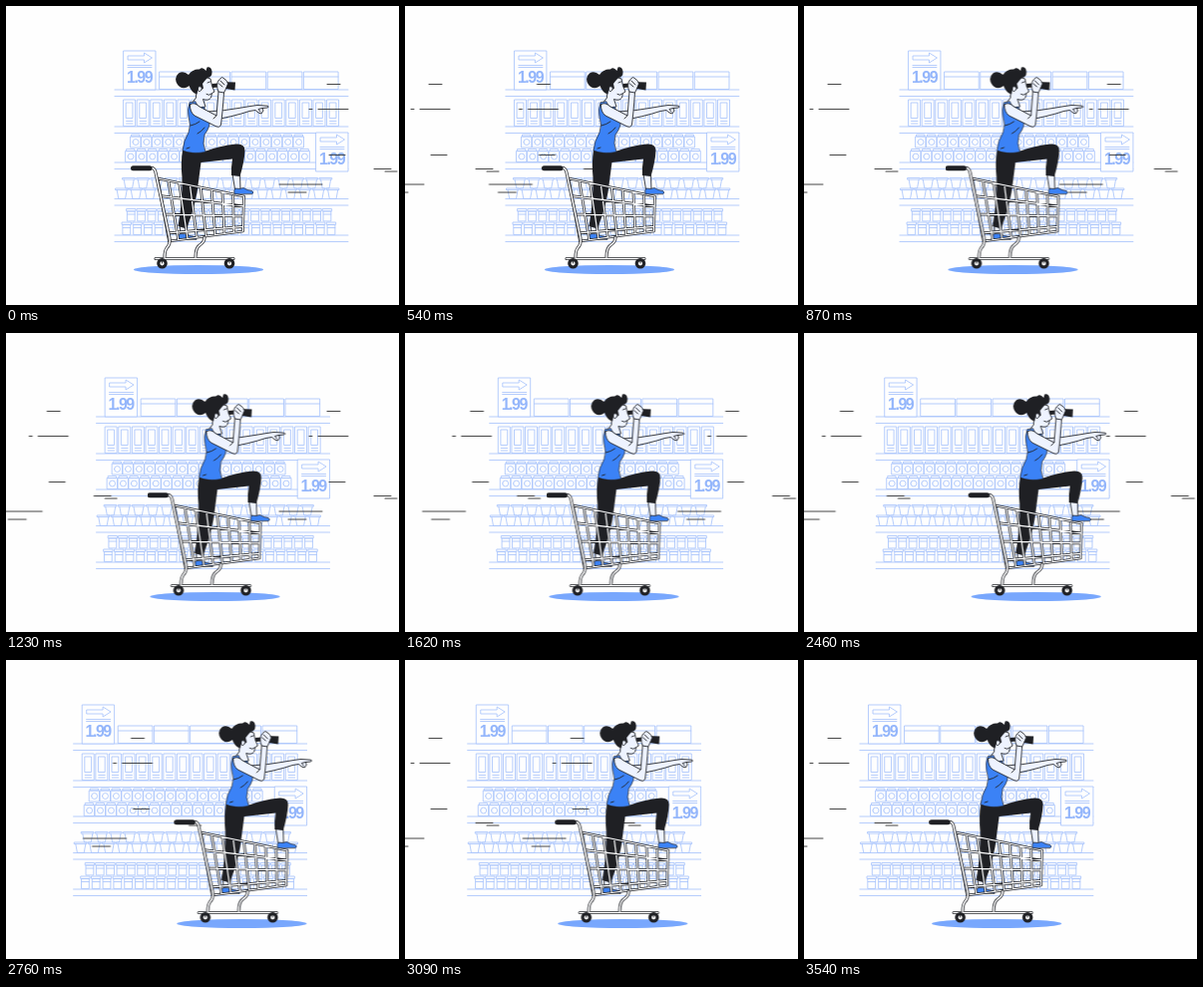
An HTML page that plays this animation: 394 by 300 pixels, repeating every 3570 ms.

```html
<!DOCTYPE html>
<html lang="en">
<head>
<meta charset="utf-8">
<title>Shopping trip</title>
<style>
  html, body { margin: 0; width: 100%; height: 100%; overflow: hidden; background: #fefefe; }
  svg { display: block; width: 394px; height: 300px; }
  path, ellipse, circle { stroke-linecap: round; stroke-linejoin: round; }

  #shelf { fill: none; stroke: #a9c5fc; stroke-width: .85; animation: drift 3570ms linear infinite; }
  #tag .paper { fill: #fefefe; }
  #tag text { fill: #94b6fb; stroke: none; font: 700 16px "Liberation Sans", Arial, sans-serif; letter-spacing: -1.5px; }
  #wind g { fill: none; stroke: #333; stroke-width: .9; animation: gust 3570ms linear infinite; }
  #rider { animation: roll 3570ms infinite; }

  .line { fill: none; stroke: #24262b; stroke-width: .9; }
  .skin { fill: #eef3ff; stroke: #24262b; stroke-width: .9; }
  .dark { fill: #1f2024; }
  .blue { fill: #3b82f6; stroke: #24262b; stroke-width: .7; }
  .tube { fill: none; stroke: #24262b; stroke-width: 3.1; }
  .gloss { fill: none; stroke: #fff; stroke-width: 1.5; }

  @keyframes drift { to { transform: translateX(-53.5px); } }
  @keyframes roll {
    0% { transform: translateX(0); animation-timing-function: cubic-bezier(.33, 0, .67, 1); }
    23.2% { transform: translateX(16.5px); }
    49% { transform: translateX(16.5px); animation-timing-function: cubic-bezier(.33, 0, .67, 1); }
    75.6% { transform: translateX(44px); animation-timing-function: cubic-bezier(.33, 0, .67, 1); }
    100% { transform: translateX(0); }
  }
  @keyframes gust {
    0% { transform: translateX(2px); visibility: hidden; animation-timing-function: step-end; }
    .7% { transform: translateX(2px); visibility: visible; animation-timing-function: cubic-bezier(.37, 0, .63, 1); }
    15.4% { transform: translateX(-296px); visibility: visible; }
    21.5% { transform: translateX(-296px); visibility: visible; animation-timing-function: step-end; }
    21.51%, 100% { transform: translateX(-296px); visibility: hidden; }
  }
</style>
</head>
<body>
<svg viewBox="0 0 394 300">
  <defs>
    <g id="tag">
      <path class="paper" d="M118 45h32v39h-32z"/>
      <path d="M122.500 50H138.500V47L146.500 52L138.500 57V54H122.500zM122 59.500H146M122 61.500H146"/>
      <text x="121" y="77">1.99</text>
    </g>
    <path id="streaks" d="M320 78.500h13M302 103.500h3M311 103.500h30M322 149.500h16M367 163.500h17M378 166h12M272 179h43M281 187h18"/>
    <path id="frame" d="M146 162.500Q149 162.500 150 167L164 233Q165 239 161 243Q159 246 159 252M199 232Q199 237 194 240Q190 243 190 252M150 253.500H228"/>
    <path id="basket"/>
    <path id="shoe" class="blue" d="M229 188.500Q228 184.500 230 183Q235 184 238 182.500Q242 185 246.500 185.500Q249 187 247 188.500z"/>
  </defs>

  <g id="shelf"></g>
  <g id="wind"></g>

  <g id="rider">
    <ellipse cx="193" cy="264.500" rx="65" ry="4.500" fill="#78a7fd"/>

    <!-- far arm -->
    <path class="skin" d="M202 106Q220 105 233 102.500L245 100.500L252 99.500L262.500 100.200Q264 101.500 262 102L257 102.500L258 105L256 108L253 107L250 104.500L244 105.500Q228 111 204 115z"/>
    <path class="line" d="M257 102.500L253 103.500L255 106"/>

    <!-- legs -->
    <path class="skin" d="M174 218L175 230H181L182 218zM227 168L229.500 184H235L234.500 168z"/>
    <path class="blue" d="M172.500 234Q171.500 230 175 228.500Q181 228 184 230.500Q191 231 191 234z"/>
    <path class="dark" d="M177 145Q175 157 176.500 172Q177 196 172.500 221L181 223.500Q191 198 193 176L195.500 157L227 153.500Q225.500 162 226 170L234.500 171Q239 156 239.500 145Q239.500 138 231 138.500Q214 140 199 146z"/>

    <!-- head -->
    <path class="skin" d="M191 80L190.500 92L186 98L192 103L200 101L197.500 93.500Q203 95.500 205.500 92L206.500 87.500L209 86L206.500 80L205 73L195 70z"/>
    <path class="line" d="M201 88.500Q203.500 90.500 206 88M202 77L204.500 76"/>
    <path class="dark" d="M183 69Q178 64.500 173 67.500Q168 72 171.500 78Q174 83 180 82Q182 81.500 183.500 80Q186 87 191.500 88.500Q192 84 194 82Q196 85 198 82.500L197 78Q200 74 202 72Q207 71.500 206.500 65.500Q205.500 60.500 201.500 61.500L200.500 65Q197 60.500 194 63.500Q187 63 183 69z"/>
    <path class="skin" d="M193 81Q197 80 196 84Q194.500 87 192.500 85z"/>

    <!-- top -->
    <path class="blue" d="M184 97Q181.500 104 183 111Q186 119 183 127Q178 135 177 145Q186 149 200 146.500Q196.500 138 199 129Q205.500 121 204 112L198 101Q193 104 190 96z"/>
    <path class="line" d="M185 120Q190 119 194 116M181 143L184 142M192 128Q196 126 199 122"/>

    <!-- near arm and binoculars -->
    <path class="dark" d="M206.500 78L213 77.500V81.500L207 82zM214 76L230 76.500L229.500 84.500L214 82z"/>
    <path class="skin" d="M184.500 99Q188 95.500 194 101L211 110L213 86Q210 79 213.500 74L216.500 71.500L219 73Q222 75 222.500 78L220 84L218.500 87Q217 108 215.500 119Q214.500 122.500 210 120.500L189 110Q184 106 184.500 99z"/>
    <path class="line" d="M215 75L219 79M213.500 78L217 81M213 86L218.500 87M208 113L211 110"/>

    <!-- cart -->
    <use href="#basket" class="tube" style="stroke-width:2.700"/>
    <use href="#basket" class="gloss" style="stroke-width:1.200"/>
    <use href="#frame" class="tube"/>
    <use href="#frame" class="gloss"/>
    <path d="M127.500 162.800H144" fill="none" stroke="#1f2024" stroke-width="5"/>
    <g fill="#fff" stroke="#1f2024" stroke-width="3.200">
      <circle cx="156.500" cy="258.300" r="3.700"/>
      <circle cx="224" cy="258.300" r="3.700"/>
    </g>
    <path class="line" d="M156.500 258V254M224 258V254"/>
    <use href="#shoe"/>
  </g>
</svg>
<script>
  const el = id => document.getElementById(id);
  const box = (x, y, w, h) => `M${x} ${y}h${w}v${h}h${-w}z`;
  const row = (x, count, pitch, item) =>
    Array.from({ length: count }, (_, i) => item(x + i * pitch)).join('');

  const crate = x => box(x, 66, 34.3, 17.5) + `M${x} 71h34.3`;
  const carton = x => box(x, 94, 11.6, 26.5) + box(x + 2.6, 97, 6.4, 15.5) +
    `M${x + 2.6} 115.500h6.4M${x + 2.6} 118h6.4`;
  const jar = y => x => box(x + 1, y, 8, 2) + box(x, y + 2, 10, 11) +
    `M${x + 2} ${y + 7.5}a3 3 0 1 0 6 0a3 3 0 1 0 -6 0`;
  const cup = y => x => box(x, y, 12.4, 1.6) + `M${x + 1.2} ${y + 1.6}l1.600 8.800h6.800l1.600 -8.800`;
  const pot = y => x => box(x, y, 9, 2.4) + box(x + .8, y + 2.4, 7.4, 10) +
    `M${x + .8} ${y + 5.5}h7.400`;

  const boards = [84, 121, 157, 193.5, 230]
    .map(y => `M109 ${y}H343M109 ${y + 6.5}H343`).join('');
  const goods = [
    row(154, 5, 36.2, crate),
    row(118, 16, 13.6, carton),
    row(125, 16, 10.9, jar(129)), row(120, 17, 10.9, jar(143.5)),
    row(117, 15, 14.1, cup(172.5)), row(110, 16, 14.1, cup(183)),
    row(121, 20, 10.35, pot(203.5)), row(116.5, 20, 10.8, pot(217))
  ].join('');
  el('shelf').innerHTML = `<path d="${boards}${goods}"/>
    <use href="#tag"/><use href="#tag" x="193" y="82"/>`;

  // Basket mesh: u runs along the cart, v from rim to floor.
  const mix = (a, b, k) => a + (b - a) * k;
  const mesh = (u, v) =>
    `${mix(mix(152, 163.5, v), mix(238.5, 237.5, v), u)} ${mix(mix(173, 236, v), mix(191, 226, v), u)}`;
  const bars = Array.from({ length: 9 }, (_, i) => `M${mesh(i / 8, 0)}L${mesh(i / 8, 1)}`);
  const rails = [0, .28, .57, .87, 1].map(v => `M${mesh(0, v)}L${mesh(1, v)}`);
  el('basket').setAttribute('d', [...bars, ...rails].join(''));

  // Start time of each gust within the loop, in ms.
  el('wind').innerHTML = [-27, 208, 763, 1200, 1583, 1980, 2420, 2796]
    .map(t => `<g style="animation-delay:${t - 3570}ms"><use href="#streaks"/></g>`).join('');
</script>
</body>
</html>
```
